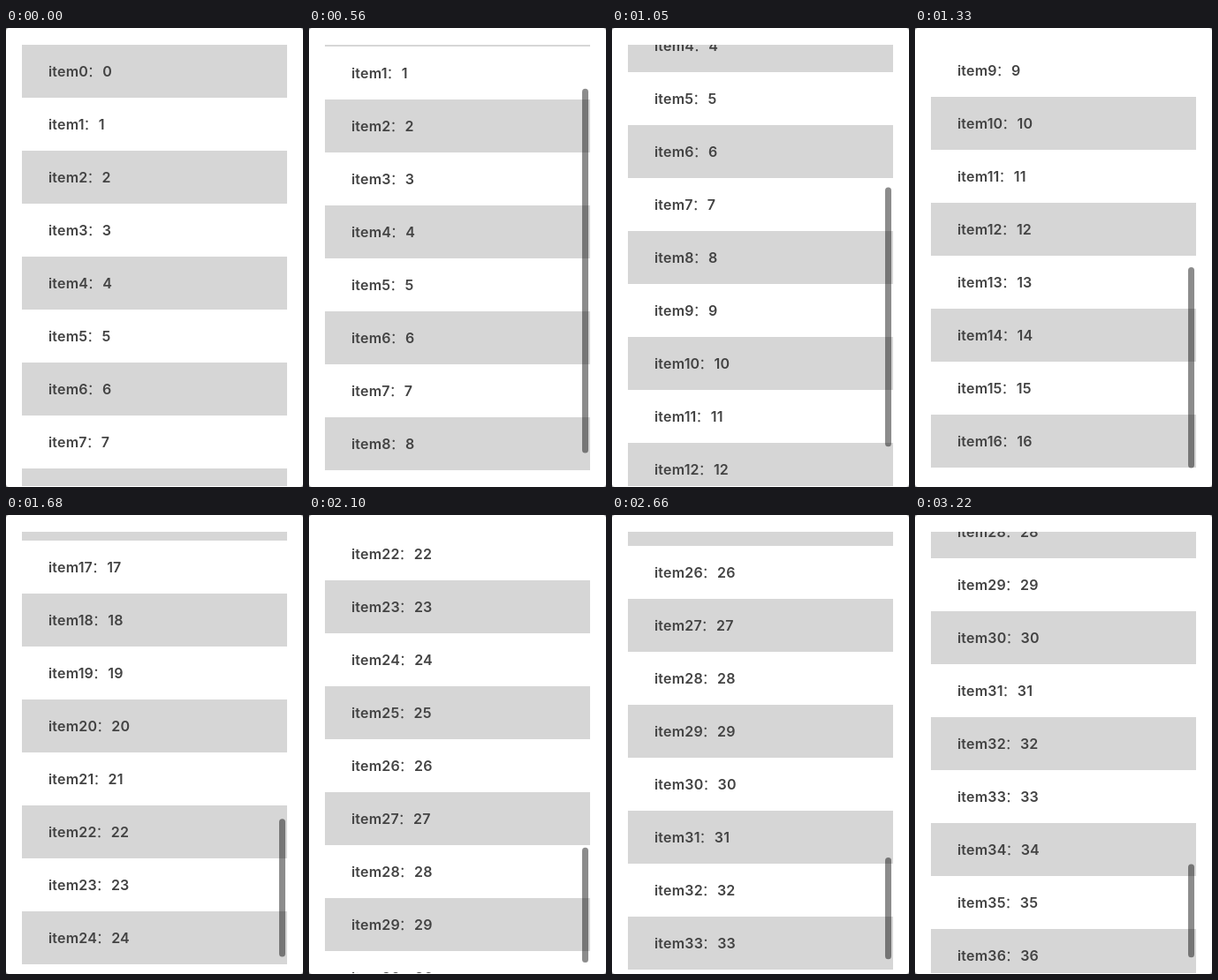
These frames come from a looping animation (336x520 px, 3.29 s). An HTML page:

```html
<!DOCTYPE html>
<html lang="zh-CN">
<head>
<meta charset="utf-8">
<title>Virtual list</title>
<style>
  html, body { margin: 0; width: 100%; height: 100%; overflow: hidden; background: #fff; }
  svg { display: block; width: 336px; height: 520px; }
  text { font: 600 16px Inter, "Noto Sans CJK SC", sans-serif; letter-spacing: .18px; fill: #434343; }
  .colon { font-weight: 400; }
</style>
</head>
<body>
<svg viewBox="0 0 336 520">
  <rect width="336" height="520" fill="#999"/>
  <rect width="336" height="520" rx="3.5" fill="#fff"/>
  <clipPath id="port"><rect x="18" y="19" width="300" height="500"/></clipPath>
  <g clip-path="url(#port)"><g id="list"></g></g>
  <rect id="thumb" x="309" width="7" rx="3.5" fill="#000" fill-opacity=".45"/>
</svg>
<script>
const LOOP = 3290, TICK = 70, LAG = 16;
const TOP = 19, VIEW = 500, ROW = 60, COUNT = 10;
const START = 350, STOP = 3150;

// A short push, a long flick and a last push: [time, offset, speed]
const keys = [
  [START, 0, 0],
  [560, 58, 0.48],
  [1050, 269, 0.4],
  [1680, 1010, 1.04],
  [2100, 1325, 0.48],
  [2660, 1544, 0.45],
  [STOP, 1710, 0.08]
];

const list = document.getElementById('list');
const thumb = document.getElementById('thumb');

function add(parent, tag, attrs) {
  const el = document.createElementNS('http://www.w3.org/2000/svg', tag);
  for (const name in attrs) el.setAttribute(name, attrs[name]);
  return parent.appendChild(el);
}

const rows = Array.from({ length: COUNT }, (_, k) => {
  const fill = k % 2 ? '#fff' : '#d6d6d6';
  add(list, 'rect', { x: 18, y: k * ROW, width: 300, height: ROW, fill });
  const text = add(list, 'text', { x: 48, y: k * ROW + 36 });
  const name = add(text, 'tspan', {});
  add(text, 'tspan', { class: 'colon', dx: -1 }).textContent = '\uff1a';
  const value = add(text, 'tspan', { dx: 1 });
  return { name, value };
});

// Cubic Hermite through the keys
function scrollAt(t) {
  t = Math.min(Math.max(t, START), STOP);
  const i = Math.max(1, keys.findIndex(k => k[0] >= t));
  const [t0, a, va] = keys[i - 1], [t1, b, vb] = keys[i];
  const h = t1 - t0, u = (t - t0) / h, w = 1 - u;
  return Math.round(
    a * w * w * (1 + 2 * u) + b * u * u * (3 - 2 * u) +
    h * u * w * (va * w - vb * u));
}

function draw(t) {
  const offset = scrollAt(t);
  // Rows are recycled one refresh after the scroll position moves
  const first = Math.floor(scrollAt(t - LAG) / ROW);
  const total = (first + COUNT) * ROW;

  list.setAttribute('transform', `translate(0 ${TOP + first * ROW - offset})`);
  rows.forEach(({ name, value }, k) => {
    name.textContent = 'item' + (first + k);
    value.textContent = first + k;
  });

  thumb.setAttribute('y', TOP + 1.5 + VIEW * offset / total);
  thumb.setAttribute('height', VIEW * VIEW / total - 4);
  thumb.setAttribute('visibility', t > START ? 'visible' : 'hidden');
}

function frame() {
  const t = performance.now() % LOOP;
  draw(Math.floor(t / TICK) * TICK);
  requestAnimationFrame(frame);
}
frame();
</script>
</body>
</html>
```
